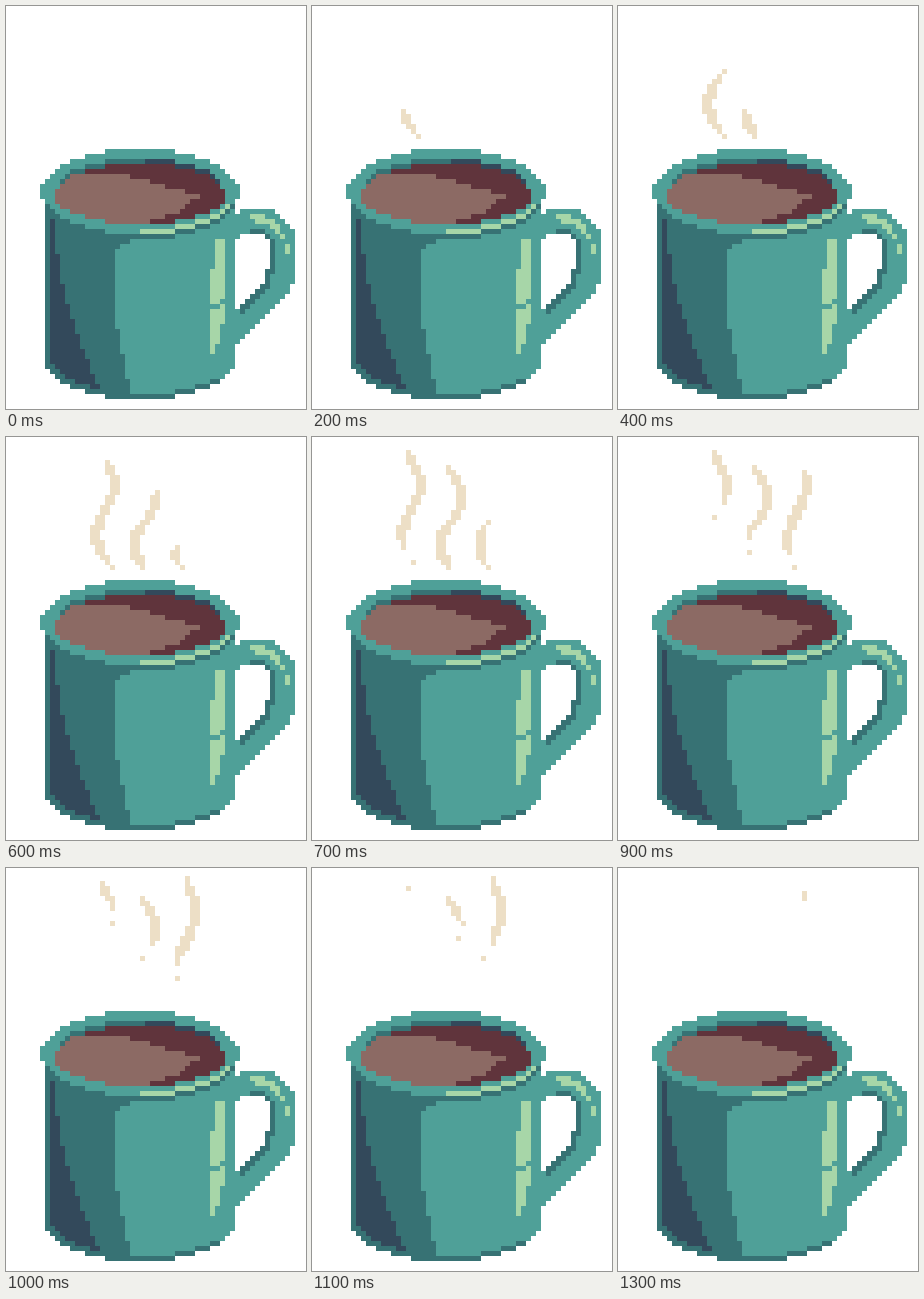
Recreate the animation shown at these times as an HTML page with a canvas. Size 300 by 403 pixels, loop 1.32 s.

```html
<!DOCTYPE html>
<html lang="en">
<head>
<meta charset="utf-8">
<title>Steaming mug</title>
<style>
  html, body { margin: 0; width: 100%; height: 100%; overflow: hidden; background: #fff; }
  canvas { display: block; }
</style>
</head>
<body>
<canvas id="stage" width="300" height="403"></canvas>
<script>
  const LOOP = 1320, STEP = 100, CELL = 5, COLS = 58, ROWS = 78;
  const teal = "#4fa098", deep = "#377274", navy = "#33495b", mint = "#a7d6a8",
        cocoa = "#60343c", cream = "#8c6a64", vapour = "#eddfc6";

  const ctx = document.getElementById("stage").getContext("2d");

  // All shapes are tested at cell centres; the mug's axis is column 26.
  const axis = 26;
  const inEllipse = (x, y, cy, rx, ry) =>
    ((x + 0.5 - axis) / rx) ** 2 + ((y + 0.5 - cy) / ry) ** 2 < 1;

  function inPolygon(x, y, points) {
    const px = x + 0.5, py = y + 0.5;
    let inside = false;
    points.forEach(([x1, y1], i) => {
      const [x2, y2] = points[(i + 1) % points.length];
      if ((y1 > py) !== (y2 > py) && px < x1 + (x2 - x1) * (py - y1) / (y2 - y1)) inside = !inside;
    });
    return inside;
  }

  const rim = (x, y) => inEllipse(x, y, 36.5, 19.7, 8.5);
  const drink = (x, y) => inEllipse(x, y, 37.05, 17.05, 6.02);
  const body = (x, y) => Math.abs(x + 0.5 - axis) < 19 && y > 36 &&
    (y < 70 || inEllipse(x, y, 69.5, 19.7, 8.5));

  const outer = [[45, 41], [47, 40], [53, 40], [55, 42], [57, 45.3], [57, 54], [55, 58], [46, 67], [45, 67]];
  const inner = [[45, 46], [46.6, 45], [51, 45], [52, 46], [52, 51], [50, 56], [45, 61]];
  const hole = (x, y) => inPolygon(x, y, inner);

  function drinkTone(x, y) {
    const edge = y < 38 ? 24 + 3.6 * (y - 33) : 36 - 0.5 * (y - 38) ** 2;
    return y > 32 && x + 0.5 < edge ? cream : cocoa;
  }

  function bodyTone(x, y) {
    const underside = !body(x, y + 1) || !body(x - 1, y + 1);
    if (rim(x, y - 1) || (y > 73 && underside)) return deep;
    if (x > 7 && y > 41 && !underside && x + 0.5 < 9 + 0.0073 * (y - 40) ** 2) return navy;
    const shade = 21 + Math.max(0, (y - 59) / 5) + Math.max(0, 2 * (47.5 - y));
    if (x < Math.floor(shade)) return deep;

    const left = y < 52 ? 41 : 40;
    const right = y < 63 ? 42 : y < 67 ? 41 : 40;
    const scratch = y === (x < 42 ? 59 : 58);
    return y > 45 && y < 69 && x >= left && x <= right && !scratch ? mint : teal;
  }

  function handleTone(x, y) {
    const shine = 41 + ((x - 48) / 3) ** 2;
    if (x > 47 && x < 55 && y > 40 && Math.abs(y - shine) < 1) return mint;
    if (x === 55 && (y === 47 || y === 48)) return mint;
    const shaded = hole(x - 1, y) || hole(x - 1, y - 1) || (x > 47 && hole(x, y + 1));
    return shaded ? deep : teal;
  }

  function tone(x, y) {
    if (drink(x, y)) return drinkTone(x, y);
    if (y < 35 && drink(x, y + 1)) return x > axis ? navy : deep;
    if (rim(x, y)) return x >= axis && y > 38 && !rim(x, y + 1) ? mint : teal;
    if (body(x, y)) return bodyTone(x, y);
    if (inPolygon(x, y, outer) && !hole(x, y)) return handleTone(x, y);
    return null;
  }

  function fillCells(x, y, w, colour) {
    ctx.fillStyle = colour;
    ctx.fillRect(4 + x * CELL, 3 + y * CELL, w * CELL, CELL);
  }

  function drawMug() {
    for (let y = 0; y < ROWS; y++)
      for (let x = 0; x < COLS; x++) {
        const colour = tone(x, y);
        if (colour) fillCells(x, y, 1, colour);
      }
  }

  // Each wisp sways along a cosine; its head climbs from the cup, then its foot follows.
  const FLOOR = 26, FADE = 4.4;
  const wisps = [
    { x: 19.1, sway: 1.8, peak: 8.5, period: 20, lean: 0, top: 2, from: 27.5, rise: 3.9, fadeAt: 6 },
    { x: 27.3, sway: 1.8, peak: 11.5, period: 17, lean: -0.09, top: 5, from: 40, rise: 5, fadeAt: 7.6 },
    { x: 35, sway: 2, peak: 7.6, period: 26, lean: 0, top: 1, from: 51, rise: 5, fadeAt: 8.4 }
  ];

  function drawWisp(w, step) {
    let head = Math.max(w.top, Math.round(w.from - w.rise * step));
    const foot = Math.min(FLOOR, Math.round(FLOOR - FADE * (step - w.fadeAt)));

    const row = (y, half) => {
      const mid = w.x + w.lean * (y - 13) + w.sway * Math.cos(2 * Math.PI * (y - w.peak) / w.period);
      const left = Math.round(mid - half);
      fillCells(left, y, Math.max(1, Math.round(mid + half) - left), vapour);
    };

    // A fading wisp drops a speck, and its last remnant shrinks from above too.
    if (foot < FLOOR) {
      if (foot - head < 6) head += Math.ceil((foot - head) / 2);
      else if (foot + 2 < FLOOR) row(foot + 2, 0.4);
    }
    for (let y = head; y < foot; y++)
      row(y, Math.min(1.1, 0.4 + 0.35 * Math.min(y - head, foot - 1 - y)));
  }

  drawMug();
  const start = performance.now();
  let shown = -1;

  function tick() {
    const step = Math.floor(((performance.now() - start) % LOOP) / STEP);
    if (step !== shown) {
      ctx.clearRect(0, 0, 300, 3 + FLOOR * CELL);
      for (const w of wisps) drawWisp(w, step);
      shown = step;
    }
    requestAnimationFrame(tick);
  }
  tick();
</script>
</body>
</html>
```
